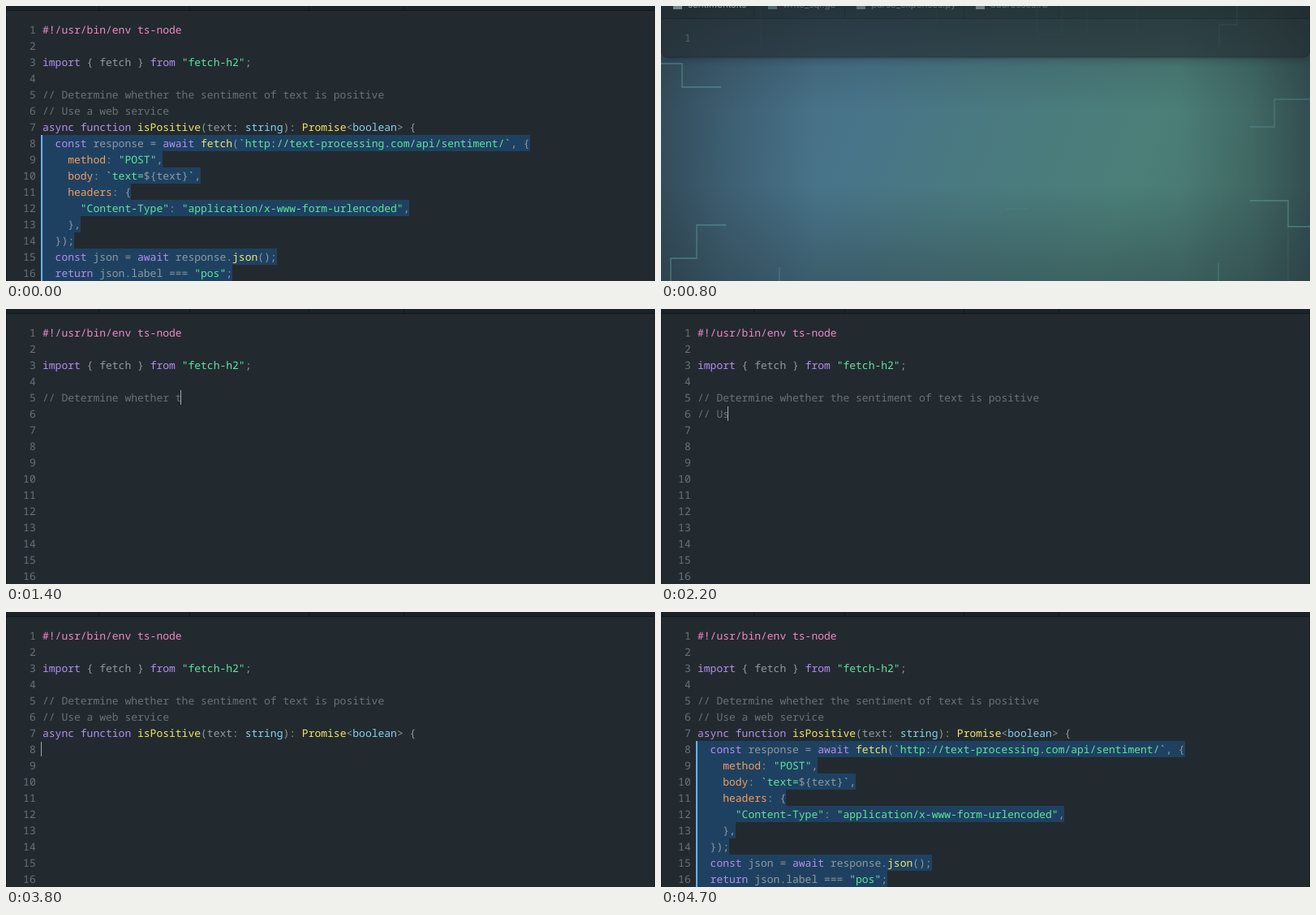
Recreate the animation shown at these times as an HTML page. Size 800 by 339 pixels, loop 6 s.

```html
<!DOCTYPE html>
<html lang="en">
<head>
<meta charset="utf-8">
<title>Typing in an editor</title>
<style>
  html, body { margin: 0; width: 100%; height: 100%; overflow: hidden; background: #222a2f; }
  svg { display: block; width: 100vw; height: 100vh; }
  text { white-space: pre; text-rendering: geometricPrecision; }
  .code text { font: 13px "Noto Sans Mono", "DejaVu Sans Mono", monospace; }
  .tabs text { font: 11.5px Inter, "Open Sans", sans-serif; fill: #7b868c; }
  .tabs .on { fill: #c6ced3; }
  .num { fill: #68727a; text-anchor: end; }
  .p { fill: #f286c4; }
  .k { fill: #b48ef0; }
  .t { fill: #8f999f; }
  .s { fill: #5ee59b; }
  .c { fill: #687278; }
  .f { fill: #f3e565; }
  .y { fill: #86d3ec; }
  .o { fill: #f59d5c; }
  .trace { fill: none; stroke: #5fa3a6; stroke-width: 1.4; }
</style>
</head>
<body>
<svg viewBox="0 0 800 339" preserveAspectRatio="none">
  <defs>
    <linearGradient id="hue" gradientUnits="userSpaceOnUse" x1="100" y1="40" x2="700" y2="260">
      <stop offset="0" stop-color="#456c84"/>
      <stop offset=".25" stop-color="#48748a"/>
      <stop offset=".5" stop-color="#4a7a80"/>
      <stop offset=".8" stop-color="#4b7f78"/>
      <stop offset="1" stop-color="#48776f"/>
    </linearGradient>
    <linearGradient id="sides">
      <stop offset="0" stop-color="#243238" stop-opacity=".55"/>
      <stop offset=".1" stop-color="#243238" stop-opacity=".25"/>
      <stop offset=".24" stop-color="#243238" stop-opacity="0"/>
      <stop offset=".8" stop-color="#243238" stop-opacity="0"/>
      <stop offset=".91" stop-color="#243238" stop-opacity=".22"/>
      <stop offset="1" stop-color="#243238" stop-opacity=".6"/>
    </linearGradient>
    <linearGradient id="ends" x2="0" y2="1">
      <stop offset="0" stop-color="#243238" stop-opacity=".5"/>
      <stop offset=".15" stop-color="#243238" stop-opacity=".22"/>
      <stop offset=".38" stop-color="#243238" stop-opacity="0"/>
      <stop offset=".65" stop-color="#243238" stop-opacity="0"/>
      <stop offset="1" stop-color="#243238" stop-opacity=".36"/>
    </linearGradient>
    <filter id="soft" x="-5%" y="-20%" width="110%" height="140%"><feGaussianBlur stdDeviation="4"/></filter>
  </defs>

  <g id="backdrop">
    <rect width="800" height="339" fill="url(#hue)"/>
    <rect width="800" height="339" fill="url(#sides)"/>
    <rect width="800" height="339" fill="url(#ends)"/>
    <path class="trace" opacity=".55" d="M0 71H26V100H74M12 339V311H44V270H80M726 240H773V272H800"/>
    <path class="trace" opacity=".38" d="M710 0V23H688V50M800 115H756V149H726M146 322V339M687 317V339"/>
    <path class="trace" opacity=".14" d="M123 0V50M773 272V339M463 0V35H494V0M525 0V35M587 0V35M340 0V24M425 250H452"/>
  </g>

  <g id="panel">
    <rect id="shade" x="1" y="-40" width="798" rx="7" fill="#12191d" opacity=".6" filter="url(#soft)"/>
    <rect id="sheet" x=".5" y="-40" width="799" rx="7" fill="#222a2f" stroke="#171d20"/>
    <g class="tabs" id="tabs">
      <rect x="1" y="-40" width="798" height="45" fill="#1c2327"/>
      <path d="M1 5.5H799M114.500 5V-40M226.500 5V-40M373.500 5V-40M490.500 5V-40" stroke="#12171a"/>
    </g>
    <g class="code" id="code"></g>
    <rect id="caret" x="43" width="1" height="18" fill="#a0a9ae"/>
  </g>
</svg>
<script>
const LOOP = 6000, STEP = 100, CHAR = 7.8, ROW = 20, LEFT = 45;
const TYPE_START = 930, RATE = 0.0476, PASTE = 4700;

// Each token starts with the letter of its colour class.
const LINES = [
  ["p#!/usr/bin/env ts-node"],
  [],
  ["kimport", "t { fetch } ", "kfrom ", 's"fetch-h2"', "t;"],
  [],
  ["c// Determine whether the sentiment of text is positive"],
  ["c// Use a web service"],
  ["kasync function ", "fisPositive", "t(text: ", "ystring", "t): ", "fPromise", "t<", "yboolean", "t> {"],
  ["k  const ", "tresponse = ", "kawait ", "ffetch", "t(", "s`http://text-processing.com/api/sentiment/`", "t, {"],
  ["o    method", "t: ", 's"POST"', "t,"],
  ["o    body", "t: ", "s`text=", "t${text}", "s`", "t,"],
  ["o    headers", "t: {"],
  ['s      "Content-Type"', "t: ", 's"application/x-www-form-urlencoded"', "t,"],
  ["t    },"],
  ["t  });"],
  ["k  const ", "tjson = ", "kawait ", "tresponse.", "fjson", "t();"],
  ["k  return ", "tjson.label === ", 's"pos"', "t;"]
];
const TABS = [
  ["sentiments.ts", 33, 15, "#9fb3bd"],
  ["write_sql.go", 150, 132, "#5f7880"],
  ["parse_expenses.py", 259, 241, "#71858c"],
  ["addresses.rb", 406, 388, "#8b999f"]
];

const $ = id => document.getElementById(id);
const set = (el, attrs) => { for (const k in attrs) el.setAttribute(k, attrs[k]); };
function add(parent, tag, attrs, text = "") {
  const el = document.createElementNS("http://www.w3.org/2000/svg", tag);
  set(el, attrs);
  el.textContent = text;
  parent.appendChild(el);
  return el;
}

TABS.forEach(([name, x, icon, color], i) => {
  add($("tabs"), "rect", { x: icon, y: -17, width: 11, height: 11, fill: color });
  add($("tabs"), "text", { x, y: -8, class: i ? "" : "on" }, name);
});

const rows = LINES.map((tokens, i) => {
  const top = (i + 1) * ROW;
  const length = tokens.reduce((n, s) => n + s.length - 1, 0);
  const mark = add($("code"), "rect", {
    x: LEFT, y: top - 1, width: length * CHAR, height: ROW, fill: "#1f4161", "shape-rendering": "crispEdges"
  });
  const number = add($("code"), "text", { x: 36.7, y: top + 14, class: "num" }, i + 1);
  const text = add($("code"), "text", { x: LEFT, y: top + 14 });
  const spans = tokens.map(s => ({ el: add(text, "tspan", { class: s[0] }), str: s.slice(1) }));
  return { mark, number, spans, length };
});
const bar = add($("code"), "rect", { x: 43, y: 159, width: 2, height: 180, fill: "#66b3f5" });

const show = (el, on) => set(el, { visibility: on ? "visible" : "hidden" });

function reveal(row, count) {
  for (const { el, str } of row.spans) {
    const part = str.slice(0, Math.max(0, count));
    if (el.textContent !== part) el.textContent = part;
    count -= str.length;
  }
}

// Linear interpolation through [time, value] points.
function track(points, t) {
  if (t <= points[0][0]) return points[0][1];
  for (let i = 1; i < points.length; i++) {
    const [a, u] = points[i - 1], [b, v] = points[i];
    if (t <= b) return u + (v - u) * (t - a) / (b - a);
  }
  return points[points.length - 1][1];
}

function draw(time) {
  const t = Math.floor(time / STEP) * STEP;
  const full = t < 500 || t >= PASTE;
  const open = full || t >= 900;

  const shift = full ? 0 : track([[500, 26], [800, 10], [900, 5], [1000, 1.5], [1100, 0.3], [1200, 0]], t);
  const alpha = full ? 1 : track([[500, 0], [600, 0.08], [700, 0.32], [800, 0.62], [900, 0.84], [1000, 0.95], [1200, 1]], t);
  set($("panel"), { transform: `translate(0 ${shift})`, opacity: alpha });
  const height = open ? 460 : 93;
  set($("sheet"), { height });
  set($("shade"), { height: height + 2 });

  // Characters left to type, counting one for each line break.
  let left = Math.max(0, Math.floor((t - TYPE_START) * RATE));
  let line = 4, col = 0;
  rows.forEach((row, i) => {
    let count = 0;
    if (full || (open && i < 4)) count = row.length;
    else if (open && i < 7 && i === line) {
      count = Math.min(left, row.length);
      col = count;
      if (left > row.length) {
        left -= row.length + 1;
        line++;
        col = 0;
      }
    }
    reveal(row, count);
    show(row.number, open || i === 0);
    show(row.mark, full && i >= 7);
  });
  show(bar, full);

  show($("caret"), open && !full);
  set($("caret"), {
    x: Math.round(43 + col * CHAR),
    y: (line + 1) * ROW,
    opacity: track([[4300, 1], [4400, 0.5], [4500, 0]], t)
  });
}

const start = performance.now();
function tick() {
  draw((performance.now() - start) % LOOP);
  requestAnimationFrame(tick);
}
tick();
</script>
</body>
</html>
```
